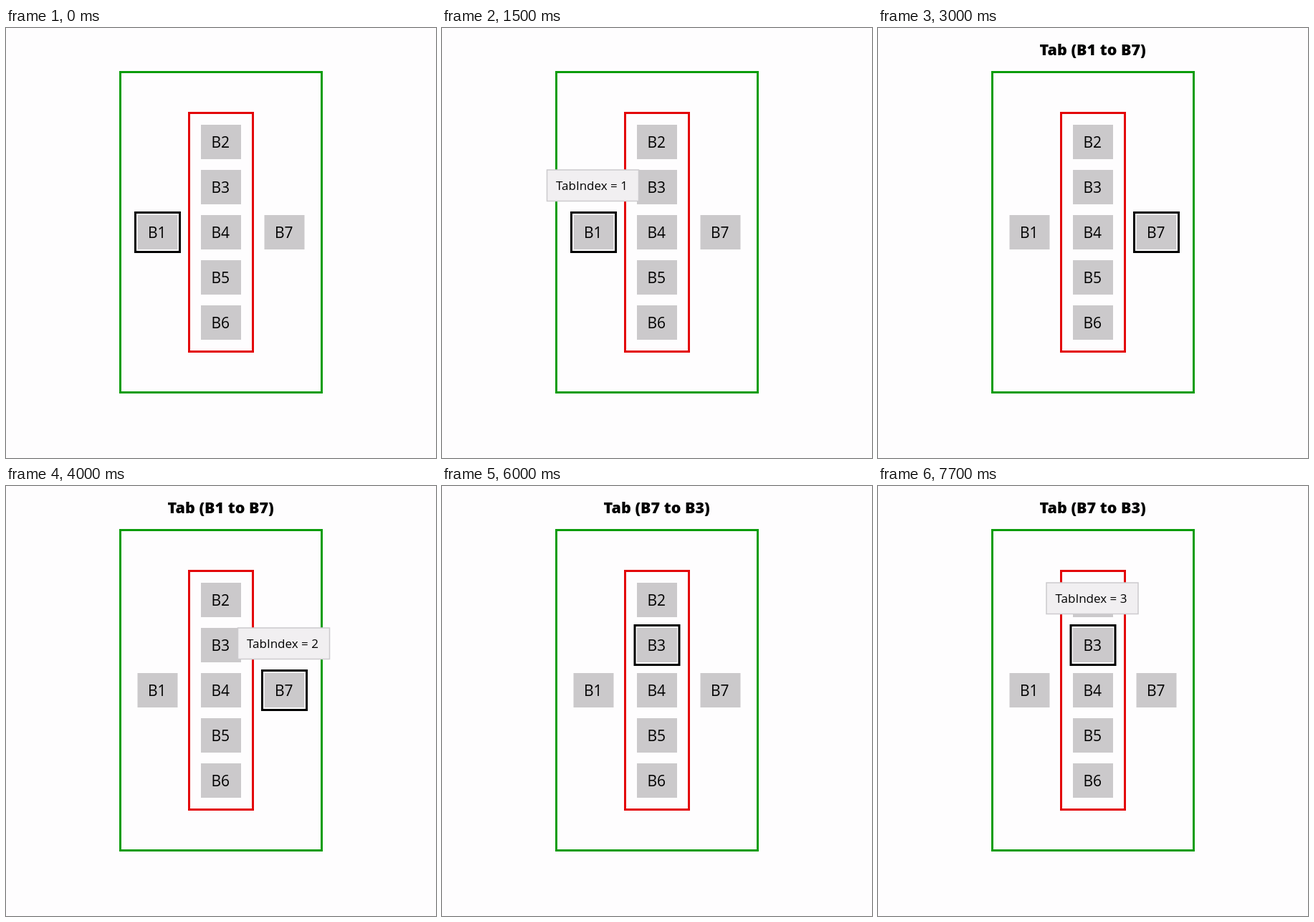
Recreate the animation shown at these times as an HTML page. Size 600 px wide and 600 px high, loop 8000 ms.

```html
<!DOCTYPE html>
<html lang="en">
<head>
<meta charset="utf-8">
<title>Tab order</title>
<style>
  html, body { margin: 0; width: 100%; height: 100%; overflow: hidden; background: #fefdfe; }
  svg { display: block; width: 100%; height: 100%; font-family: "Open Sans", "Noto Sans", sans-serif; }
  .frame { fill: none; stroke-width: 3; }
  .label { font-size: 21px; text-anchor: middle; }
  .title { font-size: 21.5px; font-weight: 800; text-anchor: middle; }
  .tip { font-size: 17px; }
</style>
</head>
<body>
<svg id="stage" viewBox="0 0 600 600"></svg>
<script>
const LOOP = 8000;
const stage = document.getElementById("stage");

function add(parent, tag, attrs, text) {
  const el = document.createElementNS("http://www.w3.org/2000/svg", tag);
  for (const key in attrs) el.setAttribute(key, attrs[key]);
  if (text) el.textContent = text;
  return parent.appendChild(el);
}

// Button centres: a column of five with one button on each side
const centres = { B1: [211.5, 285], B7: [388.5, 285] };
for (let i = 0; i < 5; i++) centres["B" + (i + 2)] = [300, 159 + 63 * i];

add(stage, "rect", { class: "frame", x: 159.5, y: 61.5, width: 281, height: 447, stroke: "#0a9c0a" });
add(stage, "rect", { class: "frame", x: 255.5, y: 118.5, width: 89, height: 333, stroke: "#e30206" });
for (const name in centres) {
  const [x, y] = centres[name];
  add(stage, "rect", { x: x - 28, y: y - 24, width: 56, height: 48, fill: "#cbc9cb" });
  add(stage, "text", { class: "label", x: x - 0.8, y: y + 8.3 }, name);
}

const focus = add(stage, "rect", { class: "frame", x: -31, y: -27.5, width: 62, height: 55, stroke: "#000" });
const title = add(stage, "text", { class: "title", x: 299.7, y: 38 });
const tip = add(stage, "g", { class: "tip" });
add(tip, "rect", { x: -64, y: -87, width: 128, height: 43.5, fill: "#f1eff1", stroke: "#cccacd", "stroke-width": 1.5 });
const tipText = add(tip, "text", { x: -51.5, y: -59 });

// Each step: focus time, tip half shown, tip fully shown
const steps = [
  { at: 0, half: 800, full: 1000, name: "B1", title: "" },
  { at: 2900, half: 3900, full: 4000, name: "B7", title: "Tab (B1 to B7)" },
  { at: 5900, half: 6900, full: 7100, name: "B3", title: "Tab (B7 to B3)" }
];

function place(el, [x, y], dx = 0) {
  el.setAttribute("transform", `translate(${x + dx} ${y})`);
}

function draw(t) {
  let now = 0;
  while (now < 2 && t >= steps[now + 1].at) now++;
  const step = steps[now];
  // The previous tip lingers half faded just after focus moves
  const leaving = now > 0 && t < step.at + 100;
  const shown = leaving ? now - 1 : now;
  const opacity = leaving ? 0.45 : t >= step.full ? 1 : t >= step.half ? 0.45 : 0;

  place(focus, centres[step.name]);
  title.textContent = step.title;
  place(tip, centres[steps[shown].name], -1);
  tipText.textContent = "TabIndex = " + (shown + 1);
  tip.setAttribute("opacity", opacity);
}

const start = performance.now();
function tick() {
  draw((performance.now() - start) % LOOP);
  requestAnimationFrame(tick);
}
tick();
</script>
</body>
</html>
```
